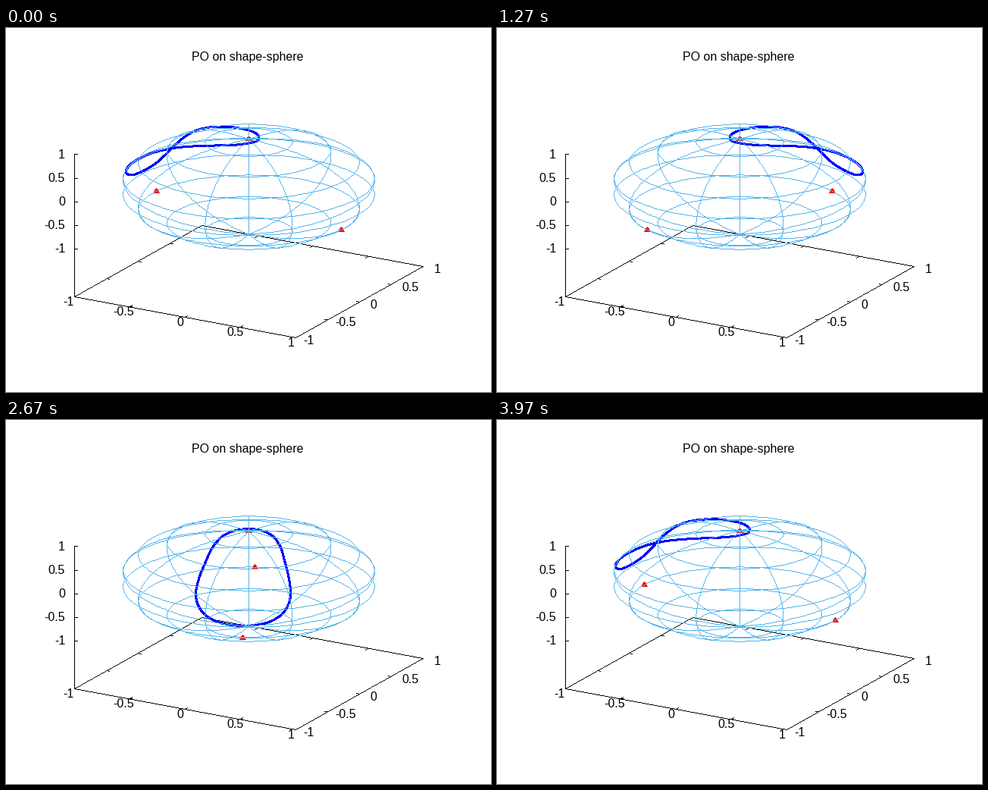
A matplotlib script that plays this animation: 640 px wide and 480 px high, repeating every 4.01 s.

```python
import numpy as np
import matplotlib.pyplot as plt
from matplotlib.animation import FuncAnimation
from matplotlib.patches import PathPatch
from matplotlib.path import Path

W, H, DPI = 640, 480, 100
PX = 72 / DPI                    # one pixel in points
POSES, TICKS = 120, 401          # 3 degree turns, shown on a 10 ms clock

ORIGIN = np.array([320.0, 209.0])
BASIS = np.array([[145.7, 27.0], [84.2, -46.8], [0.0, -62.5]])
FLOOR = -2

plt.rcParams["font.family"] = "Liberation Sans"


def project(x, y, z):
    """Map space points to stage pixels."""
    pts = np.stack(np.broadcast_arrays(x, y, z), axis=-1).astype(float)
    return ORIGIN + pts @ BASIS


def turn(pts, angle):
    c, s = np.cos(angle), np.sin(angle)
    x, y, z = pts
    return c * x - s * y, s * x + c * y, z


def closed_spline(knots, steps=16):
    """Smooth cubic curve through a closed ring of knots."""
    nxt, prv = np.roll(knots, -1, 0), np.roll(knots, 1, 0)
    ahead = np.hypot(*(nxt - knots).T)[:, None]
    behind = np.roll(ahead, 1, 0)
    slope = ((nxt - knots) / ahead * behind
             + (knots - prv) / behind * ahead) / (ahead + behind)
    t = np.linspace(0, 1, steps, endpoint=False)[None, :, None]
    p, q = knots[:, None], nxt[:, None]
    m = (slope * ahead)[:, None]
    n = (np.roll(slope, -1, 0) * ahead)[:, None]
    out = ((2 * t**3 - 3 * t**2 + 1) * p + (t**3 - 2 * t**2 + t) * m
           + (3 * t**2 - 2 * t**3) * q + (t**3 - t**2) * n)
    out = out.reshape(-1, 2)
    return np.vstack([out, out[:1]])


def orbit_curve():
    """Closed orbit, symmetric about the plane y = 0, from pole to equator."""
    tilt = [-4, -1.3, 4.4, 14, 33, 51, 65, 77, 88.2, 95.2, 97.7]
    side = [0, .11, .19, .25, .312, .357, .372, .349, .28, .17, 0]
    half = np.column_stack([np.radians(tilt), side])
    ring = np.vstack([half, half[-2:0:-1] * [1, -1]])
    a, b = closed_spline(ring).T
    r = np.sqrt(1 - b**2)
    return -r * np.sin(a), b, r * np.cos(a)


def sphere_mesh():
    lon = np.linspace(0, 2 * np.pi, 100)
    lat = np.linspace(-np.pi / 2, np.pi / 2, 100)
    rings = [project(np.cos(v) * np.cos(lon), np.cos(v) * np.sin(lon), np.sin(v))
             for v in np.radians(np.arange(-70, 71, 20))]
    arcs = [project(np.cos(lat) * np.cos(u), np.cos(lat) * np.sin(u), np.sin(lat))
            for u in np.radians(np.arange(0, 360, 40))]
    return rings + arcs


fig = plt.figure(figsize=(W / DPI, H / DPI), dpi=DPI, facecolor="white")
ax = fig.add_axes([0, 0, 1, 1])
ax.set_xlim(-0.5, W - 0.5)
ax.set_ylim(H - 0.5, -0.5)
ax.axis("off")


def raster(curve):
    """Pixels of a one pixel wide polyline, one per step of its long axis."""
    ends = np.round(curve)
    cells = [ends[:1]]
    for p, q in zip(ends[:-1], ends[1:]):
        n = int(np.abs(q - p).max())
        if n:
            k = np.arange(1, n + 1)[:, None] / n
            cells.append(np.round(p + (q - p) * k))
    return np.vstack(cells)


def hairlines(curves, color, z):
    """Draw crisp thin lines as one path of pixel squares."""
    cells = np.unique(np.vstack([raster(c) for c in curves]), axis=0)
    square = 0.45 * np.array([[-1, -1], [1, -1], [1, 1], [-1, 1], [-1, -1]])
    verts = (cells[:, None] + square).reshape(-1, 2)
    codes = [Path.MOVETO] + [Path.LINETO] * 3 + [Path.CLOSEPOLY]
    ax.add_patch(PathPatch(Path(verts, np.tile(codes, len(cells))), fc=color,
                           ec="none", lw=0, antialiased=False, zorder=z))


def label(x, y, text, ha):
    ax.text(x - 1, y + 5.5, text, size=16 * PX, ha=ha, va="baseline")


def draw_frame():
    s = np.array([-1, 1, 1, -1, -1])
    lines = [project(s, np.array([-1, -1, 1, 1, -1]), FLOOR),
             project(-1, -1, np.array([FLOOR, 1]))]

    def tick(start, step):
        lines.append(np.array([start, start + step]))

    in_x = BASIS[0] / np.hypot(*BASIS[0]) * 4
    in_y = BASIS[1] / np.hypot(*BASIS[1]) * 4
    for v in (-1, -0.5, 0, 0.5, 1):
        text = f"{v:g}"
        pad = 0 if v < 0 else 4.4          # room kept for the sign
        front, right = project(v, -1, FLOOR), project(1, v, FLOOR)
        left = project(-1, -1, v)
        tick(front, in_y)
        tick(project(v, 1, FLOOR), -in_y)
        tick(right, -in_x)
        tick(project(-1, v, FLOOR), in_x)
        tick(left, np.array([4, 0]))
        label(front[0] - 7.5 + pad / 2, front[1] + 6, text, "center")
        label(right[0] + 11 + pad, right[1] + 3, text, "left")
        label(left[0] - 11.5, left[1] - 0.8, text, "right")
    hairlines(lines, "black", 1)


draw_frame()
label(319, 37.5, "PO on shape-sphere", "center")
hairlines(sphere_mesh(), "#56b4e9", 4)

# Without smoothing every touched pixel fills, so 2 px shows as 3
orbit = orbit_curve()
orbit_line = ax.plot(*project(*orbit).T, color="#0000ff", lw=2 * PX,
                     antialiased=False, zorder=2)[0]

# Three points 120 degrees apart on one great circle
far = np.sqrt(3) / 2
marks = (np.array([0, far, -far]), np.zeros(3), np.array([1, -0.5, -0.5]))
TRIANGLE = np.array([[0, -4], [4, 2.4], [-4, 2.4]])
triangles = [ax.fill(*TRIANGLE.T, color="#ff0000", lw=0, antialiased=False,
                     zorder=3)[0] for _ in range(3)]


def update(n):
    pose = min(int((n + 0.5) * 0.3), POSES - 1)
    angle = -2 * np.pi * (pose + 1) / POSES
    orbit_line.set_data(*project(*turn(orbit, angle)).T)
    for tri, spot in zip(triangles, project(*turn(marks, angle))):
        tri.set_xy(np.round(spot) + TRIANGLE)
    return [orbit_line, *triangles]


anim = FuncAnimation(fig, update, frames=TICKS, interval=10, repeat=True,
                     repeat_delay=0, blit=False)
plt.show()
```
